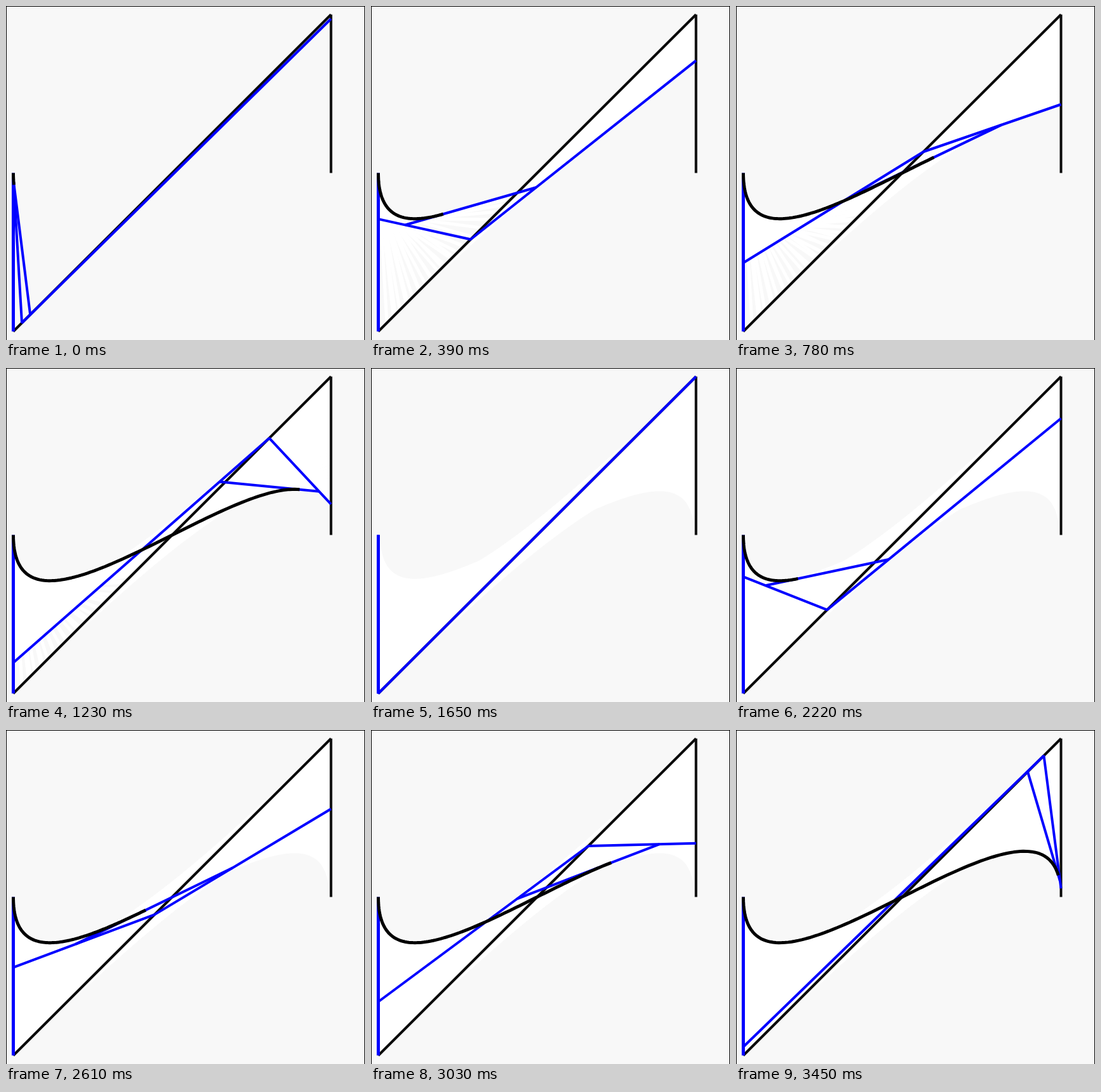
Recreate the animation shown at these times as an HTML page with a canvas. Size 565 by 527 pixels, loop 3.48 s.

```html
<!DOCTYPE html>
<html>
<head>
<meta charset="utf-8">
<style>
  html, body { margin: 0; height: 100%; overflow: hidden; background: #f8f8f8; }
  canvas { display: block; }
</style>
</head>
<body>
<canvas id="stage" width="565" height="527"></canvas>
<script>
const ctx = document.getElementById('stage').getContext('2d');
const STEP = 30, STEPS = 116, RESTART = 55;
const control = [[11.5, 263.5], [11.5, 513.5], [511.5, 13.5], [511.5, 263.5]];

// [step, curve parameter]; the parameter snaps back to 0 at RESTART
const keys = [[0, .027], [18, .392], [26, .567], [30, .653], [54, .986],
              [RESTART, 0], [97, .583], [101, .661], [115, .946]];

function paramAt(step) {
  const k = keys.findIndex(key => key[0] >= step);
  if (keys[k][0] === step) return keys[k][1];
  const [s0, t0] = keys[k - 1], [s1, t1] = keys[k];
  return t0 + (t1 - t0) * (step - s0) / (s1 - s0);
}

// One round of de Casteljau's construction
const reduce = (pts, t) => pts.slice(1).map((p, i) =>
  p.map((v, axis) => pts[i][axis] + (v - pts[i][axis]) * t));

function stroke(pts, color, width) {
  ctx.beginPath();
  pts.forEach(p => ctx.lineTo(...p));
  ctx.strokeStyle = color;
  ctx.lineWidth = width;
  ctx.stroke();
}

function drawScaffold(t, color, width) {
  const first = reduce(control, t);
  stroke(first, color, width);
  stroke(reduce(first, t), color, width);
}

function drawCurve(t, color, width) {
  if (!t) return;
  const pts = [];
  for (let i = 0; i <= 100; i++) {
    let level = control;
    while (level.length > 1) level = reduce(level, t * i / 100);
    pts.push(level[0]);
  }
  stroke(pts, color, width);
}

function draw(step) {
  ctx.fillStyle = '#f8f8f8';
  ctx.fillRect(0, 0, 565, 527);

  // Earlier poses leave a white trail
  for (let s = 0; s < step; s++) drawScaffold(paramAt(s), '#fff', 5);
  drawCurve(step < RESTART ? paramAt(step) : 1, '#fff', 6);

  ctx.fillStyle = '#000';
  ctx.fillRect(0, 0, 565, 1);
  ctx.fillRect(0, 0, 1, 527);
  ctx.fillRect(564, 0, 1, 527);

  const t = paramAt(step);
  stroke(control.slice(1, 3), '#0a0a0a', 4);
  stroke(control.slice(2), '#0a0a0a', 4);
  stroke(control.slice(0, 2), '#00f', 5);
  drawScaffold(t, '#00f', 4);
  drawCurve(t, '#000', 5);
}

ctx.lineJoin = 'bevel';
const start = performance.now();
function tick() {
  draw(Math.floor((performance.now() - start) / STEP) % STEPS);
  requestAnimationFrame(tick);
}
tick();
</script>
</body>
</html>
```
